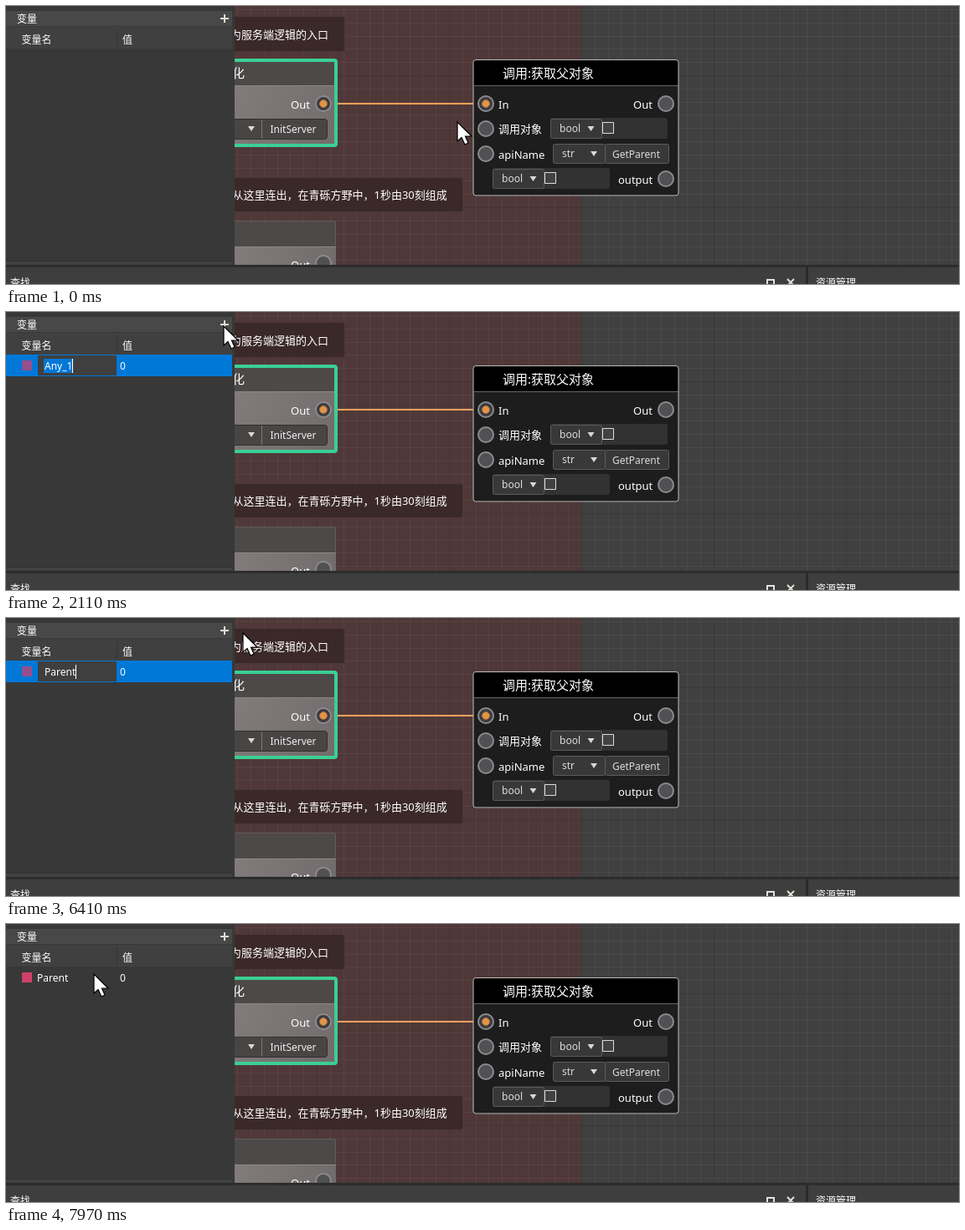
An HTML page with a canvas that plays this animation: 1138x333 px, repeating every 8000 ms.

```html
<!DOCTYPE html>
<html lang="zh">
<head>
<meta charset="utf-8">
<title>Node editor</title>
<style>
html, body { margin: 0; width: 100%; height: 100%; overflow: hidden; background: #383838; }
canvas { display: block; }
</style>
</head>
<body>
<canvas id="stage" width="1138" height="333"></canvas>
<script>
const g = document.getElementById('stage').getContext('2d');
const LOOP = 8000;
const FONT = '"Noto Sans", "Noto Sans CJK SC", "Noto Sans CJK", sans-serif';

// Pointer moves: start, end, number of steps, target x, target y, ease-out power
const START = [538, 138];
const MOVES = [
  [400, 820, 7, 340, 52, 1.1],
  [890, 1100, 4, 253, 18, 1.1],
  [1300, 1510, 4, 259, 16, 1],
  [6410, 6480, 2, 295, 18, 1.47],
  [6680, 6680, 1, 301, 14, 1],
  [6760, 7230, 7, 217, 158, 1.1],
  [7630, 7970, 5, 104, 59, 1.2]
];
// Moments at which the caret toggles
const BLINKS = [2110, 2640, 3100, 3630];

function rect(x, y, w, h, color) {
  g.fillStyle = color;
  g.fillRect(x, y, w, h);
}

function box(x, y, w, h, r, fill, stroke, line = 1) {
  g.beginPath();
  g.roundRect(x, y, w, h, r);
  if (fill) { g.fillStyle = fill; g.fill(); }
  if (stroke) { g.strokeStyle = stroke; g.lineWidth = line; g.stroke(); }
}

function text(s, x, y, size = 12, color = '#fff') {
  g.font = `${size}px ${FONT}`;
  g.fillStyle = color;
  g.fillText(s, x, y);
}

function path(points, fill) {
  g.beginPath();
  points.forEach(([x, y]) => g.lineTo(x, y));
  g.closePath();
  g.fillStyle = fill;
  g.fill();
}

function dot(x, y, r, fill, stroke, line) {
  g.beginPath();
  g.arc(x, y, r, 0, 7);
  g.fillStyle = fill;
  g.fill();
  g.strokeStyle = stroke;
  g.lineWidth = line;
  g.stroke();
}

function port(x, y, linked) {
  dot(x, y, 9, linked ? '#3c3c40' : '#515154', '#8b8b8f', 2);
  if (linked) dot(x, y, 4.3, '#e2954a', '#c8803c', 1);
}

function arrow(x, y) {
  path([[x - 4, y - 3], [x + 4, y - 3], [x, y + 3]], '#d8d8d8');
}

function combo(x, y, w, label, arrowX) {
  box(x + .5, y + 1.5, w, 23, 2, '#383838', '#5c5c5c');
  text(label, x + 11, y + 17, 12, '#ddd');
  arrow(arrowX, y + 13);
}

function boolField(x, y, end) {
  box(x, y, end - x, 25, 3, '#323232');
  combo(x, y, 61, 'bool', x + 48.5);
  box(x + 62.5, y + 5.5, 13, 13, 0, '#424242', '#ddd');
}

function gridLines(x, y, gap, color) {
  for (; x < 1138; x += gap) rect(Math.round(x), 0, 1, 310, color);
  for (; y < 310; y += gap) rect(273, Math.round(y), 865, 1, color);
}

function graph() {
  rect(273, 0, 865, 310, '#404040');
  rect(273, 0, 413, 310, '#503838');
  gridLines(276.2, 4, 15.8, '#ffffff0c');
  gridLines(371, 83, 158, '#00000038');

  box(200.5, 12.5, 204, 42, 3, '#3b2929', '#4c3636');
  text('为服务端逻辑的入口', 268, 39, 13);
  box(200.5, 205.5, 345, 41, 3, '#3b2929', '#4c3636');
  text('从这里连出，在青砾方野中，1秒由30刻组成', 270.5, 231, 13);

  rect(396, 116, 170, 2, '#f5a05a');
  entryNode();
  tickNode();
  callNode();
}

function grayBody(y, h) {
  const shade = g.createLinearGradient(273, y, 395, y + h);
  shade.addColorStop(0, '#817b7b');
  shade.addColorStop(1, '#716b6b');
  rect(273, y, 121, h, shade);
}

function entryNode() {
  grayBody(96, 70);
  rect(273, 66, 121, 29, '#4e4949');
  rect(273, 95, 121, 1, '#8d8787');
  box(200, 65, 194, 102, 2, null, '#3bcf95', 4);
  text('化', 270, 86, 15);
  text('Out', 340, 123, 13);
  port(379, 117, true);
  box(200.5, 135.5, 183, 24, 3, '#4a4545', '#302e2e');
  rect(305, 136, 1, 23, '#777');
  arrow(293, 147);
  text('InitServer', 315.5, 152, 12, '#eee');
}

function tickNode() {
  grayBody(288, 22);
  box(200.5, 257.5, 193, 31, 2, '#4e4949', '#625d5d');
  rect(273, 288, 121, 1, '#8d8787');
  text('Out', 340, 315, 13);
  port(379, 308);
}

function callNode() {
  box(558, 64.5, 245, 163, 3, '#1d1d1d');
  box(558, 64.5, 245, 31, [3, 3, 0, 0], '#000');
  rect(559, 95, 244, 1, '#666');
  box(558, 64.5, 245, 162.5, 3, null, '#bdbdbd');
  text('调用:获取父对象', 593, 86, 15);
  for (const [s, x, y] of [['In', 588, 123], ['Out', 749, 123], ['调用对象', 588, 152],
    ['apiName', 588, 183], ['output', 731, 213]]) text(s, x, y, 13);
  for (const [x, y, on] of [[573, 117, true], [573, 147], [573, 177], [788, 117], [788, 207]]) port(x, y, on);
  boolField(650, 134, 790);
  combo(653, 164, 62, 'str', 702);
  box(715.5, 165.5, 76, 23, 2, '#383838', '#5c5c5c');
  text('GetParent', 724, 182, 12, '#ddd');
  boolField(581, 194, 721);
}

function docks() {
  rect(0, 310, 1138, 23, '#3e3e3e');
  rect(0, 310, 1138, 3, '#2c2c2c');
  rect(955, 312, 3, 21, '#2a2a2a');
  text('查找', 5, 336);
  text('资源管理', 967, 336);
  g.strokeStyle = '#e2e2d8';
  g.lineWidth = 2;
  g.strokeRect(909, 328, 8, 8);
  g.beginPath();
  g.moveTo(933, 327); g.lineTo(941, 335);
  g.moveTo(941, 327); g.lineTo(933, 335);
  g.stroke();
}

function variables(t) {
  rect(0, 0, 273, 310, '#383838');
  rect(0, 6, 270, 18, '#484848');
  rect(0, 25, 270, 26, '#404040');
  rect(132, 28, 1, 21, '#343434');
  rect(0, 305, 270, 1, '#2e2e2e');
  rect(0, 306, 270, 4, '#414141');
  if (t >= 1910 && t < 1980) rect(253, 6, 17, 18, '#5a5a5a');
  text('变量', 13, 20);
  text('变量名', 18.5, 45);
  text('值', 139, 45);
  rect(256, 14, 10, 2, '#deded6');
  rect(260, 10, 2, 10, '#deded6');
  if (t >= 1980) row(t);
}

function caretOn(t) {
  if (t < 3960) return BLINKS.filter(b => b <= t).length % 2 === 1;
  return t < 4820 || t >= 5280 && t < 5880 || t >= 6410;
}

function row(t) {
  const selected = t < 7160;
  const editing = selected && t >= 2110;
  const name = t < 3960 ? 'Any_1' : t < 4090 ? '' : t < 5350 ? 'P' : 'Parent';
  if (selected) rect(0, 51, 270, 26, '#0078d7');
  rect(19, 58, 12, 12, selected ? '#954f8c' : '#d04068');
  text('0', 136, 69);
  if (!editing) return text(name, 37, 69);

  rect(38, 52, 94, 24, '#3f3f3f');
  if (t < 3960) rect(45, 56, 34, 17, '#0078d7');
  text(name, 46, 69);
  const end = Math.floor(46 + g.measureText(name).width);
  if (caretOn(t)) rect(end, 56, 1, 17, '#fff');
}

function pointerAt(t) {
  let [x, y] = START;
  for (const [from, to, steps, tx, ty, power] of MOVES) {
    if (t < from) break;
    const gap = (to - from) / Math.max(1, steps - 1);
    const done = gap ? Math.min(steps, Math.floor((t - from) / gap + .001) + 1) / steps : 1;
    const k = 1 - (1 - done) ** power;
    x += (tx - x) * k;
    y += (ty - y) * k;
  }
  return [Math.round(x), Math.round(y)];
}

function pointer(t) {
  const [x, y] = pointerAt(t);
  g.save();
  g.translate(x + 1, y + 1);
  path([[0, 0], [0, 23], [5, 18.5], [9, 27], [13, 25], [9.5, 17], [17, 17]], '#fff');
  g.strokeStyle = '#000';
  g.lineWidth = 1.2;
  g.stroke();
  g.restore();
}

function frame(now) {
  const t = now % LOOP;
  graph();
  variables(t);
  docks();
  pointer(t);
  requestAnimationFrame(frame);
}
requestAnimationFrame(frame);
</script>
</body>
</html>
```
